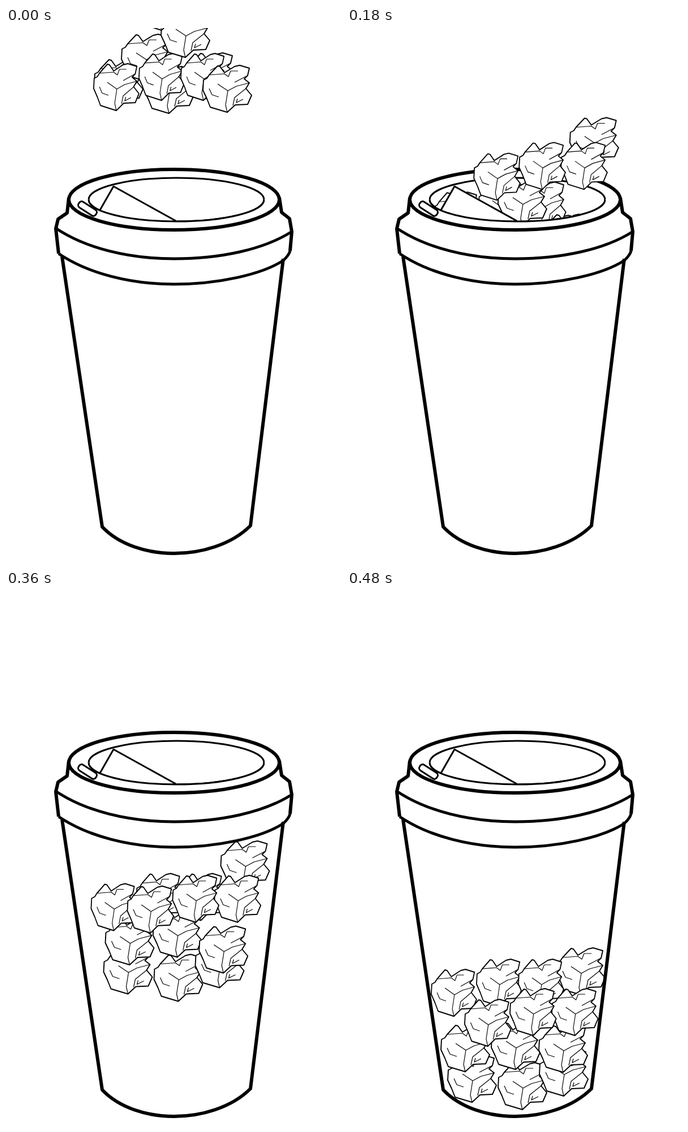
Recreate the animation shown at these times as an HTML page. Size 592 by 946 pixels, loop 510 ms.

```html
<!DOCTYPE html>
<html>
<head>
<meta charset="utf-8">
<title>Paper cup</title>
<style>
  html, body { margin: 0; width: 100%; height: 100%; overflow: hidden; background: #fff; }
  svg { display: block; width: 592px; height: 946px; }
  path, ellipse, rect { stroke: #000; stroke-width: 6; fill: none; stroke-linejoin: round; }
  .cover { fill: #fff; stroke: none; }
  .rib { stroke-width: 5; }
  .thin { stroke-width: 3; }
  .edge { stroke-width: 1.9; fill: #fff; }
  .crease { stroke-width: 1.2; }
</style>
</head>
<body>
<svg viewBox="0 0 592 946">
  <defs>
    <g id="ball">
      <path class="edge" d="M12 18L27 2 31 3 39 14 57 3 66 1 83 6 80 19 74 25 83 32 77 42 87 54 80 70 58 71 44 84 14 75 8 60 1 45 2 27 8 24Z"/>
      <path class="crease" d="M12 18L39 16 46 21 50 11 63 11M80 19L57 31M27 34L45 46 60 38 83 32M45 46L41 71 44 84M12 42L17 53 29 57M54 72L57 58 77 42M62 60L60 67 72 61"/>
    </g>
  </defs>

  <ellipse cx="297" cy="303.5" rx="186" ry="53.5"/>
  <ellipse class="thin" cx="301" cy="303.5" rx="155" ry="38.5"/>
  <g id="balls"></g>

  <path class="cover" d="M110 303L108 327 92 338 88 355 93 399C145 434 220 453 297 453S452 436 490 411Q500 402 502 394L505 360 501 337 487 326 483 303H456A155 38.5 0 0 1 146 303Z"/>
  <path class="cover" d="M166 322L190 280 300 341 240 342Z"/>
  <path class="thin" d="M166 322L190 280 300 341M146 303.5A155 38.5 0 0 0 456 303.5"/>
  <path d="M111 303.5A186 53.5 0 0 0 483 303.5"/>
  <rect class="thin" x="-18" y="-6" width="36" height="12" rx="5" transform="translate(144 319.5) rotate(33)"/>
  <path d="M111 300L108 327 92 338 88 355 93 399M483 300L487 326 501 337 505 360 502 394"/>
  <path class="rib" d="M88 354C140 389 216 408 297 408S455 392 505 360M93 399C145 434 220 453 297 453S452 436 490 411Q500 402 502 394"/>
  <path d="M99 404L170 882C200 914 250 929 297 929S398 914 432 880L490 408"/>
</svg>
<script>
const STEP = 30, LOOP = 510, FALL = 480;

// Groups from back to front: shared travel over the fall, and where each ball lands.
const groups = [
  { travel: [22, 766], spots: [[177, 820], [266, 833], [339, 809]] },
  { travel: [-38, 756], spots: [[165, 766], [369, 630]] },
  { travel: [-6, 606], size: 0.93, spots: [[228, 650], [302, 650], [148, 668]] },
  { travel: [-19, 794], spots: [[254, 762]] },
  { travel: [-9, 702], spots: [[338, 767]] },
  { travel: [-26, 801], size: 0.95, spots: [[361, 702], [287, 702], [207, 721]] }
];

const layer = document.getElementById('balls');
const balls = groups.flatMap(({ travel, size = 1, spots }) => spots.map(spot => {
  const node = document.createElementNS('http://www.w3.org/2000/svg', 'use');
  node.setAttribute('href', '#ball');
  layer.append(node);
  return { node, travel, size, spot };
}));

function draw(now) {
  const time = Math.floor(now % LOOP / STEP) * STEP;
  const left = 1 - time / FALL;
  for (const { node, travel, size, spot } of balls) {
    const [x, y] = spot.map((end, axis) => end - travel[axis] * left);
    node.setAttribute('transform', `translate(${x} ${y}) scale(${size} 1)`);
  }
  requestAnimationFrame(draw);
}
draw(performance.now());
</script>
</body>
</html>
```
